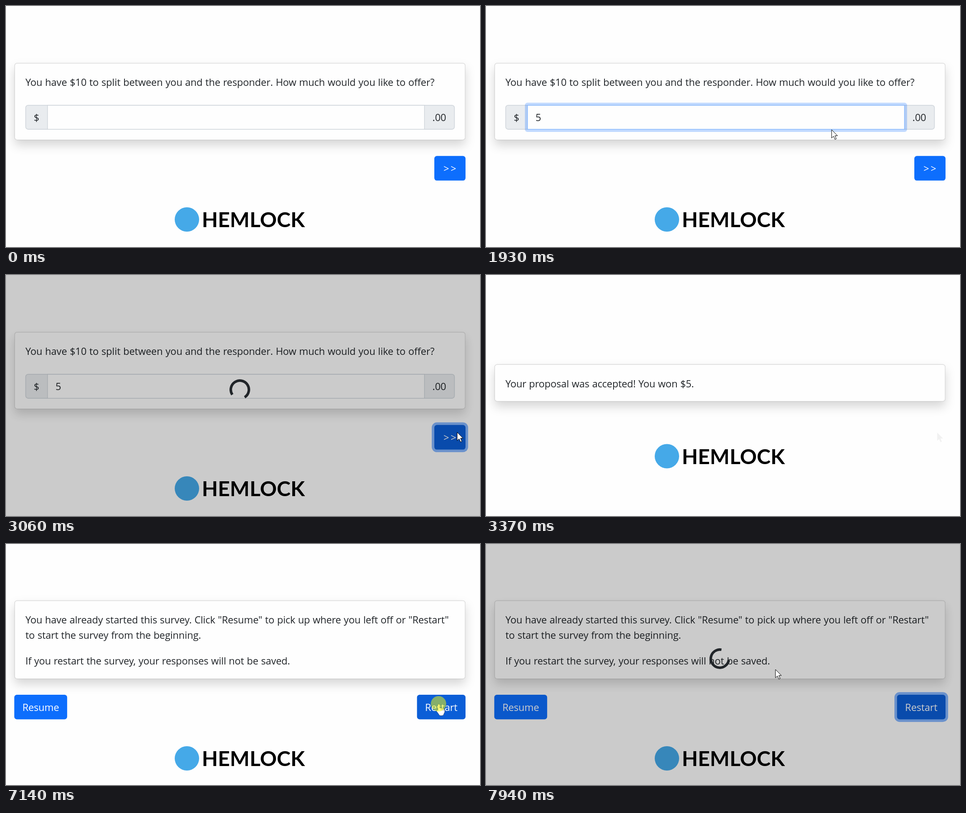
An HTML page for the animation above (8 s loop, 1048 by 534 pixels).

```html
<!DOCTYPE html>
<html lang="en">
<head>
<meta charset="utf-8">
<title>Survey demo</title>
<style>
  html, body { margin: 0; width: 100%; height: 100%; overflow: hidden; background: #fefefe; }
  svg { display: block; width: 100%; height: 100%; }
  text { font: 21.8px "Open Sans", "Noto Sans", sans-serif; letter-spacing: -.15px; word-spacing: .6px; fill: #212529; white-space: pre; }
  .ask { letter-spacing: -.1px; }
  .mid { text-anchor: middle; }
  .light { fill: #fff; }
  .next { letter-spacing: 3.2px; }
  .brand { font: 700 46px Lato, sans-serif; letter-spacing: .1px; fill: #000; }
</style>
</head>
<body>
<svg id="stage" viewBox="0 0 1048 534" xmlns="http://www.w3.org/2000/svg"></svg>
<script>
const LOOP = 8000;
const T = { focus: 1100, typed: 1640, press: 2715, send: 2850, won: 3370, resume: 5650, again: 7235, resend: 7267 };
const stage = document.getElementById('stage');

const text = (x, y, s, cls = '') => `<text x="${x}" y="${y}" class="${cls}">${s}</text>`;
const card = (y, h) => `<rect x="19.2" y="${y}" width="996" height="${h}" rx="5.5" fill="#fefefe" filter="url(#shadow)"/>
  <rect x="19.2" y="${y}" width="996" height="${h}" rx="5.5" fill="none" stroke="#000" stroke-opacity=".13" stroke-width="1.4"/>`;
const logo = y => `<circle cx="400" cy="${y}" r="27" fill="#45a9e8"/>${text(433, y + 17.3, 'HEMLOCK', 'brand')}`;
const button = (id, x, y, w, label, cls = '') => `<rect id="${id}Ring" fill="#0d6efd"/>
  <rect id="${id}" x="${x}" y="${y}" width="${w}" height="54.5" rx="5.7" fill="#0d6efd"/>
  ${text(x + w / 2 + (cls ? 1.5 : 0), y + 36, label, 'mid light ' + cls)}`;

stage.innerHTML = `
<defs><filter id="shadow" x="-5%" y="-40%" width="110%" height="200%">
  <feDropShadow dx="0" dy="11.4" stdDeviation="11.4" flood-color="#000" flood-opacity=".16"/>
</filter></defs>
<rect width="1048" height="534" fill="#fefefe"/>
<g id="offerPage">
  ${card(126.7, 170)}
  ${text(43, 177, 'You have $10 to split between you and the responder. How much would you like to offer?', 'ask')}
  <rect x="43.5" y="220" width="948" height="53.2" rx="5.5" fill="#e9ecef" stroke="#ced4da" stroke-width="1.4"/>
  ${text(67.5, 255, '$', 'mid')}${text(958, 255, '.00', 'mid')}
  <rect id="fieldRing" fill="#0d6efd"/>
  <rect id="field" x="91.7" y="220" width="833.6" height="53.2" fill="#fefefe" stroke-width="1.4"/>
  <g id="typed">${text(109.5, 255, '5')}</g>
  <g id="stepper"><rect x="886" y="229.5" width="21.5" height="34.5" fill="#f0f0f0"/>
    <path d="M891 241l5.7-6 5.7 6zM891 252l5.7 6 5.7-6z" fill="#505050"/></g>
  ${button('next', 947, 332.3, 69, '&gt;&gt;', 'next')}
  ${logo(473)}
</g>
<g id="wonPage">
  ${card(198.3, 81.6)}
  ${text(43, 249, 'Your proposal was accepted! You won $5.')}
  ${logo(401.5)}
</g>
<g id="resumePage">
  ${card(125.5, 173.3)}
  ${text(43, 175.5, 'You have already started this survey. Click "Resume" to pick up where you left off or "Restart"')}
  ${text(43, 210, 'to start the survey from the beginning.')}
  ${text(43, 267, 'If you restart the survey, your responses will not be saved.')}
  ${button('resume', 18.3, 334, 116.9, 'Resume')}
  ${button('restart', 908.7, 334, 107.3, 'Restart')}
  ${logo(475)}
</g>
<g id="busy">
  <rect width="1048" height="534" fill="#000" opacity=".2"/>
  <circle id="spin" cx="517" cy="254" r="20" fill="none" stroke="#212529" stroke-width="5.7" stroke-dasharray="94.25 31.42"/>
</g>
<g id="mouse">
  <path id="arrow" d="M0 0V18.5L4.3 14.4 7.4 21.5 10.4 20.2 7.4 13.3H13Z" fill="#fff" stroke="#000"/>
  <path id="beam" d="M-5-9.5H-1.5L.5-8.5 2.5-9.5H6M.5-8.5V9.5M-5 10.5H-1.5L.5 9.5 2.5 10.5H6" fill="none" stroke="#000" stroke-width="1.5"/>
  <path id="hand" d="M-2 2Q0-1.5 2 2V9Q4 7.7 5 9.5 7 8.5 8 10.3 10 9.5 10.8 11 13 11 13 13.5V18L11 22Q11 25.5 7 25.8H3Q1 25.5 0 23L-5 16Q-6.5 12.5-2 14ZM5 9.5V14M8 10.3V14.5M10.8 11V15" fill="#fff" stroke="#1b2a40" stroke-width=".6"/>
</g>
<circle id="glow" r="17" fill="#ff0" opacity=".5"/>`;

const el = {};
stage.querySelectorAll('[id]').forEach(n => el[n.id] = n);
const set = (n, attrs) => { for (const k in attrs) n.setAttribute(k, attrs[k]); };
const show = (n, on) => n.setAttribute('visibility', on ? 'inherit' : 'hidden');

const clamp = v => Math.min(1, Math.max(0, v));
const ramp = (t, from, len) => clamp((t - from) / len);
const easeOut = p => 1 - (1 - p) ** 2;
const smooth = p => p * p * (3 - 2 * p);
const fade = (t, from) => easeOut(ramp(t, from, 150));
const mix = (a, b, p) => `rgb(${a.map((v, i) => Math.round(v + (b[i] - v) * p))})`;
const within = (t, a, b) => t >= a && t < b;

const moves = [
  { on: 120, off: 1440, start: 120, len: 650, from: [971, 517], to: [701, 254], ease: easeOut },
  { on: 1690, off: T.won, start: 1690, len: 810, from: [701, 254], to: [997.5, 348.5], ease: smooth },
  { on: T.won, off: T.resume, start: T.won, len: 1, from: [997.5, 349], to: [997.5, 349], ease: easeOut },
  { on: 6070, off: 7365, start: 6050, len: 960, from: [640, 0], to: [957, 354.5], ease: smooth },
  { on: 7365, off: LOOP, start: 7365, len: 575, from: [957, 354.5], to: [640, 278], ease: p => p * p }
];
function pointer(t) {
  const m = moves.find(m => within(t, m.on, m.off));
  if (!m) return null;
  const p = m.ease(ramp(t, m.start, m.len));
  return m.from.map((v, i) => v + (m.to[i] - v) * p);
}
const inside = (p, x0, y0, x1, y1) => !!p && p[0] > x0 && p[0] < x1 && p[1] > y0 && p[1] < y1;

// Averaging hits since the page opened gives the short hover transition.
function hover(t, opened, box) {
  let sum = 0;
  for (let i = 0; i < 8; i++) {
    const past = t - i * 18;
    if (past >= opened) sum += inside(pointer(past), ...box);
  }
  return sum / 8;
}
function ring(n, x, y, w, h, p, alpha) {
  const d = 5.7 * p;
  set(n, { x: x - d, y: y - d, width: w + 2 * d, height: h + 2 * d, rx: 5.7 * (alpha > .3) + d, opacity: alpha * p });
}

const BLUE = [13, 110, 253], HOVER = [11, 94, 215], ACTIVE = [10, 88, 202];
const NEXT = [947, 332, 1016, 387], RESTART = [909, 334, 1016, 389];
const CURSORS = ['arrow', 'beam', 'hand'];

function draw(t) {
  const offer = t < T.won, won = within(t, T.won, T.resume), resume = t >= T.resume;
  const busy = within(t, T.send, T.won) || t >= T.resend;
  show(el.offerPage, offer);
  show(el.wonPage, won);
  show(el.resumePage, resume);

  const at = pointer(t);
  const onField = offer && !busy && inside(at || (t > 1400 && t < 1690 ? [701, 254] : null), 92, 220, 925, 273);
  const focus = fade(t, T.focus) * (1 - fade(t, T.press));
  ring(el.fieldRing, 91.7, 220, 833.6, 53.2, focus, .25);
  set(el.field, { stroke: mix([206, 212, 218], [134, 183, 254], focus) });
  show(el.typed, offer && t >= T.typed);
  show(el.stepper, offer && onField);

  const press = fade(t, T.press);
  ring(el.nextRing, 947, 332.3, 69, 54.5, press, .5);
  set(el.next, { fill: press ? mix(HOVER, ACTIVE, t < T.send ? press : 0) : mix(BLUE, HOVER, hover(t, 0, NEXT)) });

  const again = fade(t, T.again);
  ring(el.restartRing, 908.7, 334, 107.3, 54.5, again, .5);
  set(el.restart, { fill: mix(BLUE, HOVER, again ? 1 : hover(t, T.resume, RESTART)) });

  show(el.busy, busy);
  const turn = (t - (resume ? T.resend : T.send)) / 750 * 360;
  set(el.spin, { transform: `rotate(${45 + turn} 517 254)` });

  const glow = within(t, 1030, 1190) || within(t, 2690, T.send) || within(t, 7110, 7240);
  show(el.glow, glow);
  show(el.mouse, at);
  if (!at) return;
  const onButton = !busy && (offer && inside(at, ...NEXT) || resume && inside(at, ...RESTART));
  const onText = resume && !busy && (inside(at, 43, 150, 992, 220) || inside(at, 43, 242, 992, 276));
  const kind = onButton ? 'hand' : onField || onText ? 'beam' : 'arrow';
  CURSORS.forEach(k => show(el[k], k === kind));
  set(el.mouse, { transform: `translate(${at})`, opacity: won ? .05 : 1 });
  set(el.arrow, { fill: won ? '#000' : '#fff', 'stroke-width': won ? 0 : 1 });
  set(el.glow, { cx: at[0] - .7, cy: at[1] - .5 });
}

const begin = performance.now();
function tick() {
  draw((performance.now() - begin) % LOOP);
  requestAnimationFrame(tick);
}
tick();
</script>
</body>
</html>
```
